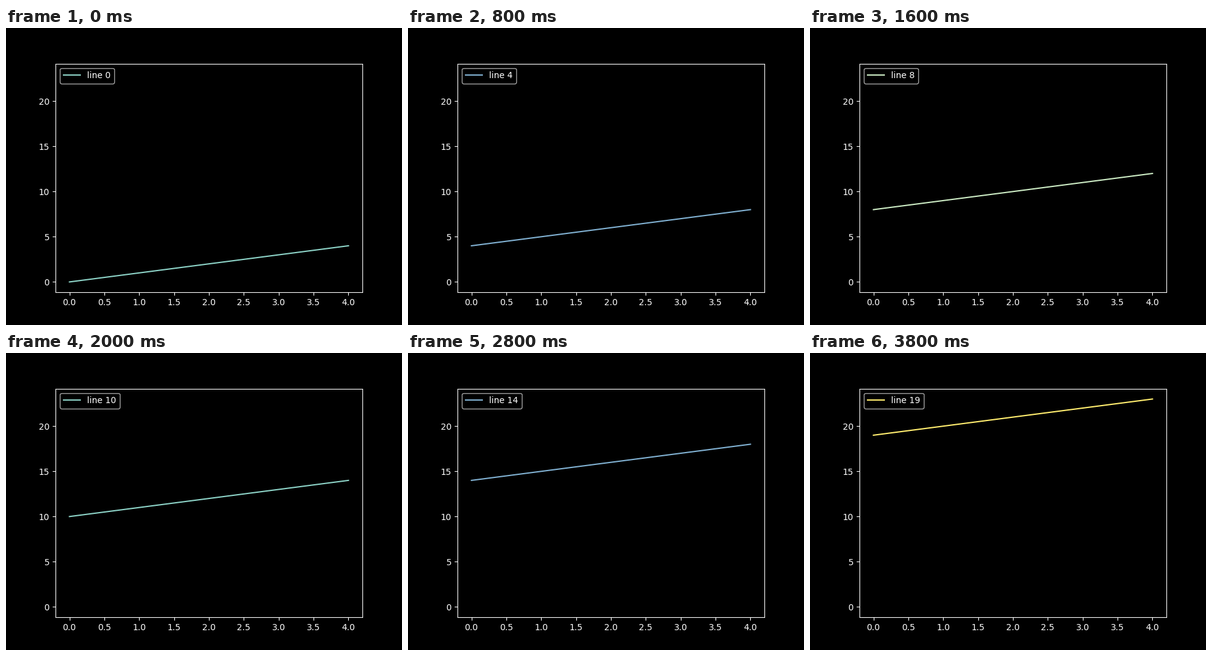
A matplotlib script that plays this animation: 640x480 px, repeating every 4000 ms.

```python
import matplotlib.pyplot as plt
import numpy as np
from matplotlib.animation import FuncAnimation

FRAMES = 20
INTERVAL = 200  # ms

plt.style.use("dark_background")
colors = plt.rcParams["axes.prop_cycle"].by_key()["color"]

fig, ax = plt.subplots(figsize=(6.4, 4.8), dpi=100)
x = np.arange(5)
top = FRAMES - 1 + x[-1]
ax.set_xlim(-0.05 * x[-1], 1.05 * x[-1])
ax.set_ylim(-0.05 * top, 1.05 * top)
line, = ax.plot(x, x)


def update(i):
    line.set_ydata(x + i)
    line.set_color(colors[i % len(colors)])
    line.set_label(f"line {i}")
    ax.legend(loc="upper left")


anim = FuncAnimation(fig, update, frames=FRAMES, interval=INTERVAL,
                     init_func=lambda: update(0), repeat=True, repeat_delay=0)
plt.show()
```
